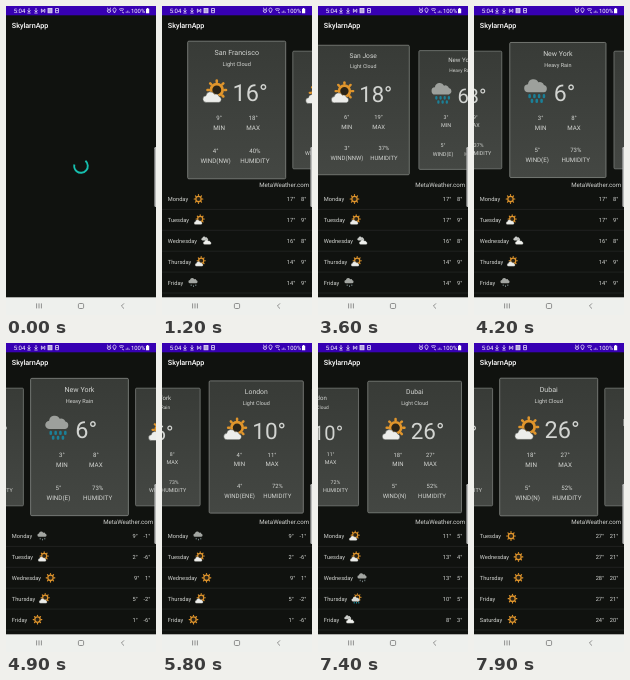
An HTML page that plays this animation: 150 by 309 pixels, repeating every 8000 ms.

```html
<!DOCTYPE html>
<html lang="en">
<head>
<meta charset="utf-8">
<title>Weather cards</title>
<style>
html, body { margin: 0; width: 100%; height: 100%; overflow: hidden; background: #10120f; }
svg { display: block; width: 100vw; height: 100vh; }
text { font-family: Roboto, "Noto Sans", sans-serif; fill: #d2d4d1; text-rendering: geometricPrecision; }
</style>
</head>
<body>
<svg id="stage" viewBox="0 0 150 309" preserveAspectRatio="none">
  <defs>
    <linearGradient id="fill" x1="0" y1="0" x2="0" y2="1">
      <stop offset="0" stop-color="#383b37"/><stop offset="1" stop-color="#444743"/>
    </linearGradient>
    <path id="cloud" d="M-8 5a4 4 0 0 1-.6-8 5.4 5.4 0 0 1 10.2-1.8A4 4 0 0 1 7-2.2 3.7 3.7 0 0 1 7 5Z"/>
    <g id="sun" stroke="#e0952c">
      <g id="rays" stroke-width="2.6" stroke-linecap="round"></g>
      <circle r="5.9" fill="#2a2418" stroke-width="2.8"/>
    </g>
    <g id="lc">
      <use href="#sun" transform="translate(1.5 -2) scale(.95)"/>
      <use href="#cloud" transform="translate(-2 6) scale(.8)" fill="#ecedea" stroke="#41443f" stroke-width=".6"/>
    </g>
    <g id="hc">
      <use href="#cloud" transform="translate(-3 -4) scale(.68)" fill="#c9cbc8"/>
      <use href="#cloud" transform="translate(2.5 4) scale(.8)" fill="#f0f1ee" stroke="#41443f" stroke-width=".7"/>
    </g>
    <g id="hr">
      <use href="#cloud" transform="translate(0 -5)" fill="#9da09c"/>
      <path d="M-7 3v1.5M-2.3 3v1.5M2.3 3v1.5M7 3v1.5M-4.7 7.6v1.5M0 7.6v1.5M4.7 7.6v1.5" stroke="#1b8098" stroke-width="2.5" stroke-linecap="round"/>
    </g>
    <g id="lr">
      <use href="#cloud" transform="translate(0 -3) scale(.9)" fill="#a3a6a2"/>
      <path d="M-5 5v1.6M0 7v1.6M5 5v1.6" stroke="#7d8b8d" stroke-width="2" stroke-linecap="round"/>
    </g>
    <g id="s">
      <use href="#sun" transform="translate(2 -3) scale(.85)"/>
      <use href="#cloud" transform="translate(-1 2) scale(.8)" fill="#d9dbd8"/>
      <path d="M-5 8v1.4M0 8v1.4M5 8v1.4" stroke="#1c95a6" stroke-width="2.2" stroke-linecap="round"/>
    </g>
  </defs>

  <rect width="150" height="309" fill="#10120f"/>
  <g id="content">
    <g id="cards"></g>
    <text x="147.2" y="181.1" font-size="6.15" text-anchor="end">MetaWeather.com</text>
    <g id="list"></g>
  </g>
  <circle id="spinner" cx="75" cy="160" r="6.8" pathLength="360" fill="none" stroke="#16bfae" stroke-width="1.9"/>

  <text x="5.8" y="21.8" font-size="7.2" font-weight="500" style="fill:#fff">SkylarnApp</text>
  <rect x="148.4" y="141" width="3" height="60" rx="1.2" fill="#b9bab9"/>

  <rect width="150" height="9.3" fill="#3700b3"/>
  <text x="7.8" y="7" font-size="6" style="fill:#fff">5:04</text>
  <g fill="none" stroke="#e4dcf6" stroke-width=".8">
    <path d="M23 2v4m-1.5-1.6L23 6l1.5-1.6M21.4 7h3.2M30 2v4m-1.5-1.6L30 6l1.5-1.6M28.4 7h3.2"/>
    <path d="M35.4 3v3.4l3.4-3.4v3.4z"/>
    <rect x="42" y="2.4" width="4" height="4.4" fill="#b5a4e0"/>
    <path d="M49.5 2.5h3v4.2h-3zM50 4.6h2"/>
    <circle cx="103" cy="4.8" r="1.7"/><path d="M101 2.6l1-.7M105 2.6l-1-.7M103 3.8v1.2"/>
    <path d="M108.5 7l-1.5-2.8a1.6 1.6 0 1 1 3 0z"/>
    <path d="M113 3.3q2.5-1.6 5 0M114.2 4.6q1.3-.8 2.6 0M116 6l2 1M120.2 6.8v-1.2M121.8 6.8V4.6M123.2 6.8V5.8"/>
  </g>
  <text x="125" y="7" font-size="5.9" style="fill:#fff">100%</text>
  <path d="M140 2.8h.9v-.8h1.4v.8h.9v4.4H140z" fill="#fff"/>

  <rect y="291.3" width="150" height="18" fill="#eef0ed"/>
  <g fill="none" stroke="#777" stroke-width=".8">
    <path d="M30.6 297.4v5M33 297.4v5M35.4 297.4v5M118 297.4l-2.6 2.6 2.6 2.6"/>
    <rect x="72.4" y="297.5" width="5.2" height="5" rx="1.2"/>
  </g>
</svg>
<script>
const LOOP = 8000, PITCH = 98, MID_X = 74.7, MID_Y = 104;
const $ = id => document.getElementById(id);

function add(parent, tag, attrs, content) {
  const el = document.createElementNS("http://www.w3.org/2000/svg", tag);
  for (const key in attrs) el.setAttribute(key, attrs[key]);
  if (content !== undefined) el.textContent = content;
  parent.appendChild(el);
  return el;
}
const icon = (parent, name, x, y, size) =>
  add(parent, "use", { href: "#" + name, class: "icon", transform: `translate(${x} ${y}) scale(${size / 24})` });

for (let a = 0; a < 360; a += 45)
  add($("rays"), "path", { d: "M0-8V-9.4", transform: `rotate(${a})` });

// city, state, icon, temperature, min, max, wind, direction, humidity
const cities = [
  ["San Francisco", "Light Cloud", "lc", 16, 9, 18, 4, "NW", 40],
  ["San Jose", "Light Cloud", "lc", 18, 6, 19, 3, "NNW", 37],
  ["New York", "Heavy Rain", "hr", 6, 3, 8, 5, "E", 73],
  ["London", "Light Cloud", "lc", 10, 4, 11, 4, "ENE", 72],
  ["Dubai", "Light Cloud", "lc", 26, 18, 27, 5, "N", 52]
];

function addCard() {
  const g = add($("cards"), "g", {});
  add(g, "rect", { x: -49, y: -68.8, width: 98, height: 137.6, rx: 1.2, fill: "url(#fill)", stroke: "#7c7f7b", "stroke-width": .9 });
  return g;
}
const label = (g, str, x, y, size, anchor = "middle") =>
  add(g, "text", { x, y: y - MID_Y, "font-size": size, "text-anchor": anchor }, str);

const cards = cities.map(([city, state, sky, now, min, max, wind, dir, wet]) => {
  const g = addCard();
  label(g, city, 0, 48.7, 7.1);
  label(g, state, 0, 59.8, 5.6);
  icon(g, sky, -21.5, 86 - MID_Y, 25);
  label(g, now + "°", -4.2, 95.3, 23.5, "start");
  const shift = dir.length > 2 ? 3.8 : 0;
  const columns = [[-17.6, min + "°", "MIN", 114], [16.4, max + "°", "MAX", 114],
    [shift - 21.1, wind + "°", `WIND(${dir})`, 147], [shift + 18.2, wet + "%", "HUMIDITY", 147]];
  for (const [x, value, name, y] of columns) {
    label(g, value, x, y, 6.1);
    label(g, name, x, y + 10.2, 6.3);
  }
  return g;
});
const lastCard = addCard();
label(lastCard, "More cities", 0, 80, 11.4);
cards.push(lastCard);

const week = ["Monday", "Tuesday", "Wednesday", "Thursday", "Friday", "Saturday"];
const iconX = [36.5, 37.5, 44.5, 38.5, 31.5];
const forecasts = [
  { from: 0, day: 0, xs: iconX, sky: ["sun", "lc", "hc", "lc", "lr"], hi: [17, 17, 16, 14, 14], lo: [8, 9, 8, 9, 9] },
  { from: 4850, day: 0, xs: iconX, sky: ["lr", "lc", "sun", "lc", "sun"], hi: [9, 2, 9, 5, 1], lo: [-1, -6, 1, -2, -6] },
  { from: 6400, day: 0, xs: iconX, sky: ["lc", "lc", "lr", "s", "hc"], hi: [11, 13, 13, 10, 8], lo: [5, 4, 5, 5, 3] },
  { from: 7700, day: 1, xs: [37, 44.5, 44.5, 38.5, 38.5], sky: Array(5).fill("sun"), hi: [27, 27, 28, 27, 24], lo: [21, 21, 20, 21, 20] }
];

const lists = forecasts.map(f => {
  const g = add($("list"), "g", {});
  f.sky.forEach((sky, i) => {
    const y = 193 + i * 20.9;
    add(g, "text", { x: 5.8, y: y + 2, "font-size": 5.7 }, week[f.day + i]);
    icon(g, sky, f.xs[i], y, 11);
    const temps = add(g, "text", { x: 144.3, y: y + 2, "font-size": 5.7, "text-anchor": "end" }, f.hi[i] + "°");
    add(temps, "tspan", { dx: 5.6 }, f.lo[i] + "°");
    add(g, "path", { d: `M0 ${y + 10.4}H150`, stroke: "#2a2c2a", "stroke-width": .6 });
  });
  return g;
});

// time in ms, page, speed in pages per second
const track = [
  [0, 0, 0], [2130, 0, 0], [2800, .755, 1.2], [3050, 1, 0], [3120, 1, 0], [3600, 1.3, 1.2],
  [4050, 1.82, .7], [4800, 2, 0], [4900, 2.012, .3], [5800, 2.8, .6], [6450, 3, 0],
  [6620, 3, 0], [7400, 3.775, 1.1], [7750, 4, 0], [LOOP, 4, 0]
];

function pageAt(t) {
  const i = track.findIndex(k => k[0] > t);
  const [t0, p0, v0] = track[i - 1], [t1, p1, v1] = track[i];
  const span = (t1 - t0) / 1000, u = (t - t0) / (t1 - t0), w = 1 - u;
  return p0 * w * w * (1 + 2 * u) + p1 * u * u * (3 - 2 * u) + span * u * w * (v0 * w - v1 * u);
}

const ease = x => x * x * (3 - 2 * x);
function spin(t) {
  const turns = t / 1333 + .4, k = turns % 1;
  const head = 270 * ease(Math.min(1, 2 * k)), tail = 270 * ease(Math.max(0, 2 * k - 1));
  const angle = tail + 360 * turns + 720 * t / 4444 - 194;
  $("spinner").setAttribute("stroke-dasharray", `${Math.max(4, head - tail)} 360`);
  $("spinner").setAttribute("transform", `rotate(${angle} 75 160)`);
}

const icons = document.querySelectorAll("#content .icon");
const show = (el, on) => { el.style.display = on ? "" : "none"; };

function draw(t) {
  const loading = t < 950;
  show($("spinner"), loading);
  show($("content"), !loading);
  if (loading) return spin(t);
  icons.forEach(el => show(el, t >= 1080));
  const page = pageAt(t);
  cards.forEach((card, i) => {
    const dx = (i - page) * PITCH;
    const scale = Math.max(.855, 1 - .15 * Math.abs(dx) / 75);
    card.setAttribute("transform", `translate(${MID_X + dx} ${MID_Y}) scale(${scale})`);
  });
  const current = forecasts.filter(f => f.from <= t).length - 1;
  lists.forEach((list, i) => show(list, i === current));
}

const start = performance.now();
function tick() {
  draw((performance.now() - start) % LOOP);
  requestAnimationFrame(tick);
}
tick();
</script>
</body>
</html>
```
